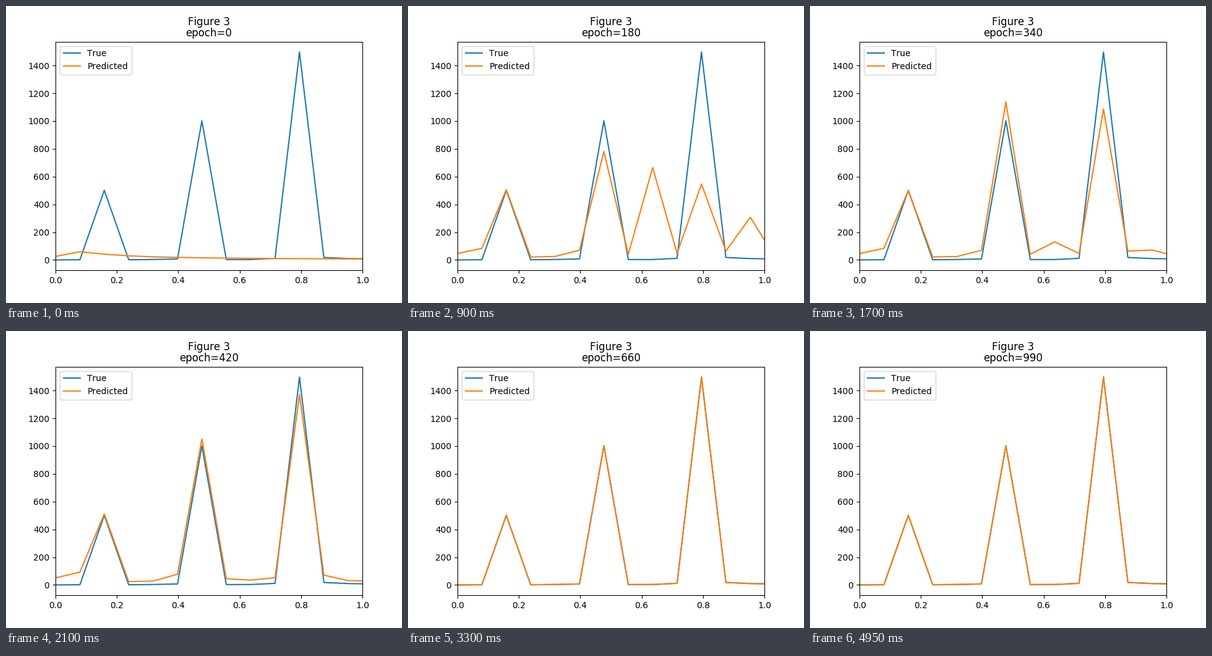
A matplotlib script for the animation above (5000 ms loop, 640x480 px).

```python
import numpy as np
import matplotlib.pyplot as plt
from matplotlib.animation import FuncAnimation

plt.rcParams["text.kerning_factor"] = 6

FRAMES = 100
INTERVAL = 50
EPOCHS_PER_FRAME = 10
SAMPLES = 1000
BINS = 14

# The true signal is three sines; its spectrum has a peak for each of them.
t = np.linspace(0, 4 * np.pi, SAMPLES)
signal = sum(amp * np.sin(rate * t) for amp, rate in [(1, 1), (2, 3), (3, 5)])
true = np.abs(np.fft.rfft(signal))[:BINS]
freq = np.fft.rfftfreq(SAMPLES, t[1])[:BINS]

k = np.arange(BINS)
LOW, MID, HIGH = 2, 6, 10
hump = 90 * (k + 0.25) / (k**2 + 0.9)           # untrained output
ripple = 50 + 35 * np.cos(1.4 * (k - 1.2))      # noise between the peaks
ripple[[LOW, MID, HIGH]] = 0
ghost = np.where(k == 8, 1, 0) + np.where(k == 12, 0.44, 0)

# How strong each part is at the key epochs
KEY_EPOCHS = [0, 180, 270, 420, 600]
LOW_GAIN = [0, 1.01, 0.98, 1.02, 1]
MID_GAIN = [0, 0.78, 1.21, 1.05, 1]
HIGH_GAIN = [0, 0.365, 0.56, 0.915, 1]
REST_GAIN = [0, 0, 0, 0, 1]
HUMP = [1, 0, 0, 0, 0]
RIPPLE = [0, 1, 0.9, 1.1, 0]
GHOST = [0, 650, 200, 18, 0]


def predicted(epoch):
    def level(values):
        return np.interp(epoch, KEY_EPOCHS, values)

    gain = np.full(BINS, level(REST_GAIN))
    gain[[LOW, MID, HIGH]] = level(LOW_GAIN), level(MID_GAIN), level(HIGH_GAIN)
    return (gain * true + level(HUMP) * hump
            + level(RIPPLE) * ripple + level(GHOST) * ghost)


fig, ax = plt.subplots(figsize=(6.4, 4.8), dpi=100)
ax.plot(freq, true, label="True")
line, = ax.plot(freq, predicted(0), label="Predicted")
margin = 0.05 * true.max()
ax.set_xlim(0, 1)
ax.set_ylim(-margin, true.max() + margin)
ax.legend(loc="upper left")
title = ax.set_title("Figure 3\nepoch=0", linespacing=1.0)


def update(frame):
    epoch = frame * EPOCHS_PER_FRAME
    line.set_ydata(predicted(epoch))
    title.set_text(f"Figure 3\nepoch={epoch}")
    return line, title


anim = FuncAnimation(fig, update, frames=FRAMES, interval=INTERVAL,
                     repeat=True, repeat_delay=0, blit=False)
plt.show()
```
